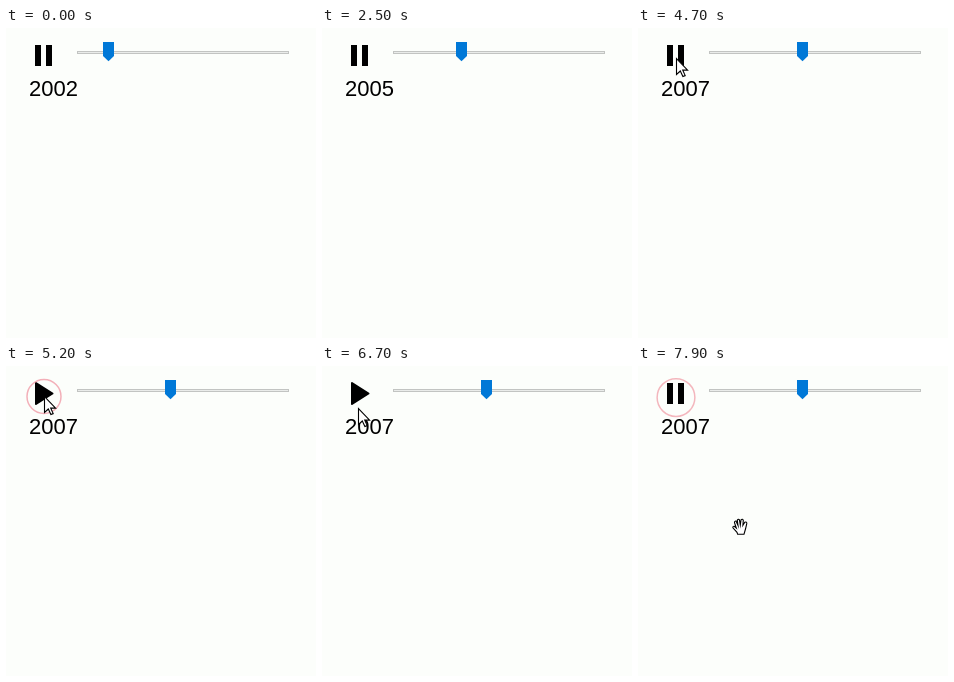
Recreate the animation shown at these times as an HTML page with a canvas. Size 310x310 px, loop 8 s.

```html
<!DOCTYPE html>
<html lang="en">
<head>
<meta charset="utf-8">
<title>Year slider</title>
<style>
html, body { margin: 0; width: 100%; height: 100%; overflow: hidden; background: #fcfefb; }
canvas { display: block; width: 310px; height: 310px; }
</style>
</head>
<body>
<canvas id="stage"></canvas>
<script>
const SIZE = 310, LOOP = 8000, TICK = 100;
const canvas = document.getElementById('stage');
const ctx = canvas.getContext('2d');
const ratio = window.devicePixelRatio || 1;
canvas.width = canvas.height = Math.round(SIZE * ratio);

const FIRST_YEAR = 2002;
const PAUSED_AT = 5100, RESUMED_AT = 7600;
const CLICK = { x: 38, y: 30.5 };

// Pointer stops: time, x, y
const STOPS = [
  [3300, -14, 54], [3400, -4, 50], [3900, 38, 30], [5300, 38, 30],
  [5800, 59, 128], [6000, 59, 128], [6700, 36, 42], [6900, 38, 31],
  [7600, 38, 31], [7800, 100, 154], [7900, 102, 160], [8000, 102, 160]
];

const ARROW = new Path2D('M0.5 0.5V16.5L4.3 13L6.9 18.6L9.2 17.6L6.7 12.1H11.6Z');
const HAND = new Path2D('M5.6 16.2L5 14.4L.9 9.8Q.6 8 2.3 8.3L4.3 10L2.5 4.6' +
  'Q2.5 2.8 4 3.1L6 7.5L5.3 2.3Q6 .7 7.4 1.7L8.3 7L9 1.8Q10.3 .6 11.3 2.2' +
  'L10.9 7.3L12.8 4.2Q14.9 3.4 14.8 5.4L13.5 11L12 16.2Z');

const ease = k => k * k * (3 - 2 * k);

function pointerAt(t) {
  if (t < STOPS[0][0]) return null;
  const i = STOPS.findIndex(s => s[0] > t);
  const [t0, x0, y0] = STOPS[i - 1], [t1, x1, y1] = STOPS[i];
  const k = ease((t - t0) / (t1 - t0));
  return { x: x0 + (x1 - x0) * k, y: y0 + (y1 - y0) * k };
}

function drawSlider(step) {
  ctx.fillStyle = '#c2c4c2';
  ctx.fillRect(71, 23, 212, 3);
  ctx.fillStyle = '#eaecea';
  ctx.fillRect(72, 24, 210, 1);

  const x = Math.round(97.2 + step * 12.4);
  ctx.fillStyle = '#0078d7';
  ctx.beginPath();
  ctx.moveTo(x, 14);
  ctx.lineTo(x + 11, 14);
  ctx.lineTo(x + 11, 28);
  ctx.lineTo(x + 5.5, 33.3);
  ctx.lineTo(x, 28);
  ctx.fill();
}

function drawButton(paused) {
  ctx.fillStyle = ctx.strokeStyle = '#000';
  if (!paused) {
    ctx.fillRect(29, 17, 6, 21);
    ctx.fillRect(40, 17, 6, 21);
    return;
  }
  ctx.lineWidth = 2;
  ctx.lineJoin = 'round';
  ctx.beginPath();
  ctx.moveTo(30, 17);
  ctx.lineTo(46.5, 27.5);
  ctx.lineTo(30, 38);
  ctx.closePath();
  ctx.fill();
  ctx.stroke();
}

function drawRing(age, dy, life) {
  if (age < 0 || age >= life) return;
  const k = age / life;
  ctx.strokeStyle = `rgba(238, 130, 145, ${0.8 - 0.3 * k})`;
  ctx.lineWidth = 1.5;
  ctx.beginPath();
  ctx.arc(CLICK.x, CLICK.y + dy, 5 + 14 * (1 - (1 - k) ** 2) + k, 0, Math.PI * 2);
  ctx.stroke();
}

function drawPointer(p) {
  if (!p) return;
  const onMap = p.y > 75;
  ctx.save();
  ctx.translate(Math.round(p.x) - (onMap ? 8 : 0), Math.round(p.y) - (onMap ? 8 : 0));
  ctx.fillStyle = '#fff';
  ctx.strokeStyle = '#000';
  ctx.lineWidth = 1.1;
  ctx.lineJoin = 'miter';
  const shape = onMap ? HAND : ARROW;
  ctx.fill(shape);
  ctx.stroke(shape);
  ctx.restore();
}

function draw(now) {
  const t = Math.floor((now % LOOP) / TICK) * TICK;
  const step = Math.min(5, Math.floor((t + 500) / 1000));

  ctx.setTransform(ratio, 0, 0, ratio, 0, 0);
  ctx.fillStyle = '#fcfefb';
  ctx.fillRect(0, 0, SIZE, SIZE);

  drawSlider(step);
  drawButton(t >= PAUSED_AT && t < RESUMED_AT);
  ctx.fillStyle = '#000';
  ctx.font = '22px "Liberation Sans", Arial, sans-serif';
  ctx.fillText(FIRST_YEAR + step, 23, 68);
  drawRing(t - PAUSED_AT + 100, 0, 350);
  drawRing(t - RESUMED_AT, 1, 400);
  drawPointer(pointerAt(t));
}

const start = performance.now();
function frame() {
  draw(performance.now() - start);
  requestAnimationFrame(frame);
}
frame();
</script>
</body>
</html>
```
